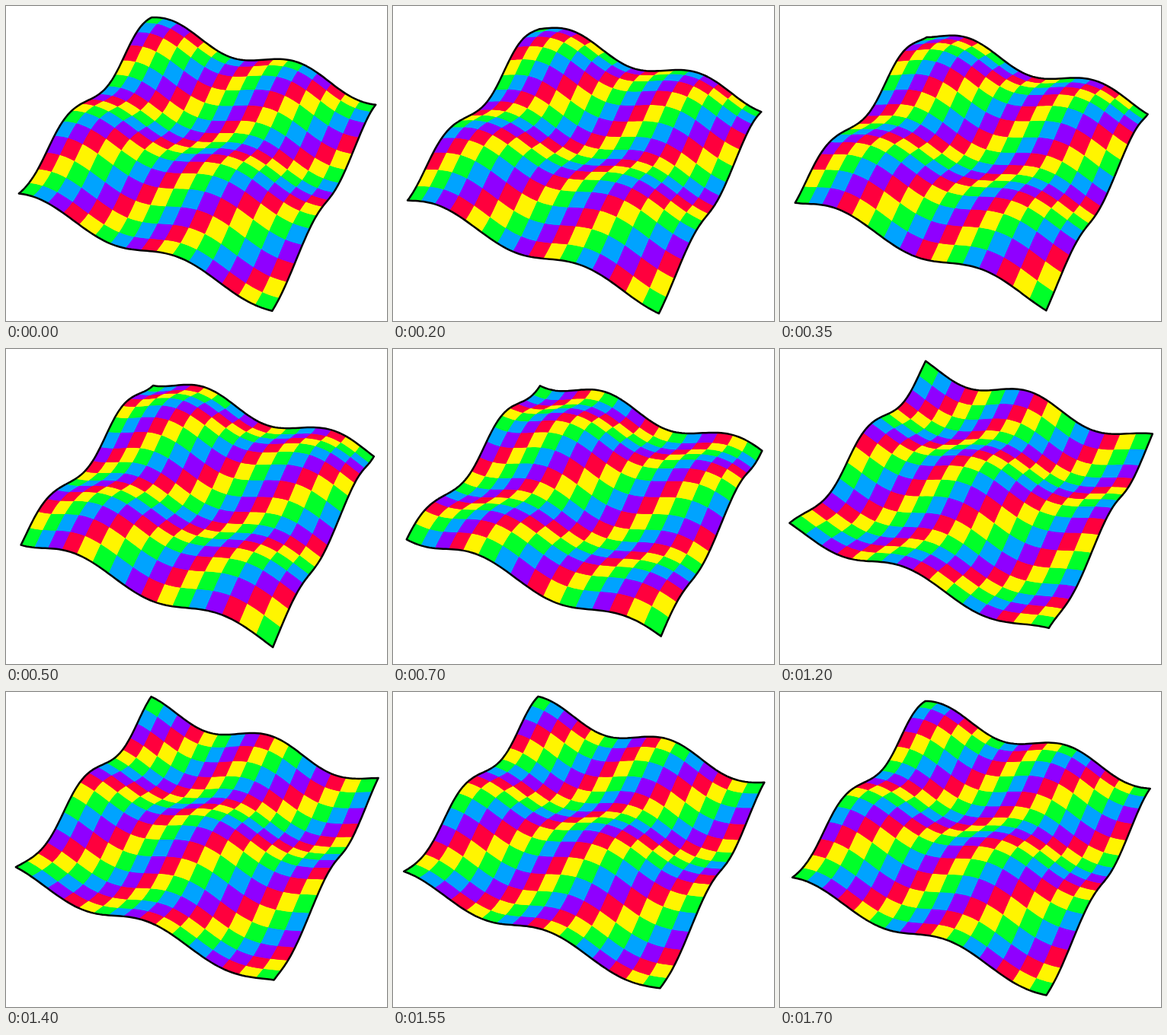
Recreate the animation shown at these times as an HTML page with a canvas. Size 500 by 414 pixels, loop 1750 ms.

```html
<!DOCTYPE html>
<html lang="en">
<head>
<meta charset="utf-8">
<title>Waving sheet</title>
<style>
  html, body { margin: 0; width: 100%; height: 100%; overflow: hidden; background: #fff; }
  canvas { display: block; }
</style>
</head>
<body>
<canvas id="stage" width="500" height="414"></canvas>
<script>
const ctx = document.getElementById('stage').getContext('2d');

const LOOP = 1750, STEP = 50;
const STEPS = LOOP / STEP;
const CELLS = 16, SUB = 5;
const SPAN = 11;          // width of the sheet in radians of wave
const AMP = 0.0472;       // wave height relative to the sheet's side
const COLORS = [129.6, 201.6, 273.6, 345.6, 57.6].map(h => `hsl(${h}, 100%, 50%)`);

// Two crossing waves, one along each side of the sheet
function height(u, v, phase) {
  const x = SPAN * (u - 0.5), y = SPAN * (v - 0.5);
  return AMP * (Math.sin(x - phase) - Math.sin(y + phase));
}

// Perspective view of sheet point (u, v), both from 0 to 1
function project(u, v, phase) {
  const z = height(u, v, phase);
  const w = 1 - 0.0912 * u + 0.1806 * v - 0.228 * z;
  return [
    (16.2 + 302.8 * u + 210.2 * v - 59.5 * z) / w,
    (243.8 + 105.5 * u - 211 * v - 284 * z) / w
  ];
}

// Outline of a square patch of the sheet, n pieces per side
function patch(u, v, size, n, phase) {
  const path = new Path2D();
  const add = (a, b) => path.lineTo(...project(u + a * size, v + b * size, phase));
  for (let k = 0; k < n; k++) add(k / n, 0);
  for (let k = 0; k < n; k++) add(1, k / n);
  for (let k = n; k > 0; k--) add(k / n, 1);
  for (let k = n; k > 0; k--) add(0, k / n);
  path.closePath();
  return path;
}

function draw(phase) {
  ctx.fillStyle = '#fff';
  ctx.fillRect(0, 0, 500, 414);

  const cells = [];
  for (let j = 0; j < CELLS; j++) {
    for (let i = 0; i < CELLS; i++) {
      cells.push({
        path: patch(i / CELLS, j / CELLS, 1 / CELLS, SUB, phase),
        color: COLORS[(i - j + CELLS * 5) % 5]
      });
    }
  }

  // Widened underlay closes the seams between cells
  ctx.lineWidth = 1;
  for (const { path, color } of cells) {
    ctx.strokeStyle = ctx.fillStyle = color;
    ctx.fill(path);
    ctx.stroke(path);
  }
  for (const { path, color } of cells) {
    ctx.fillStyle = color;
    ctx.fill(path);
  }

  ctx.strokeStyle = '#000';
  ctx.lineWidth = 2.5;
  ctx.lineJoin = 'round';
  ctx.stroke(patch(0, 0, 1, CELLS * SUB, phase));
}

function tick() {
  const step = Math.floor((performance.now() % LOOP) / STEP);
  draw(2 * Math.PI * (step + 1) / STEPS);
  requestAnimationFrame(tick);
}
tick();
</script>
</body>
</html>
```
